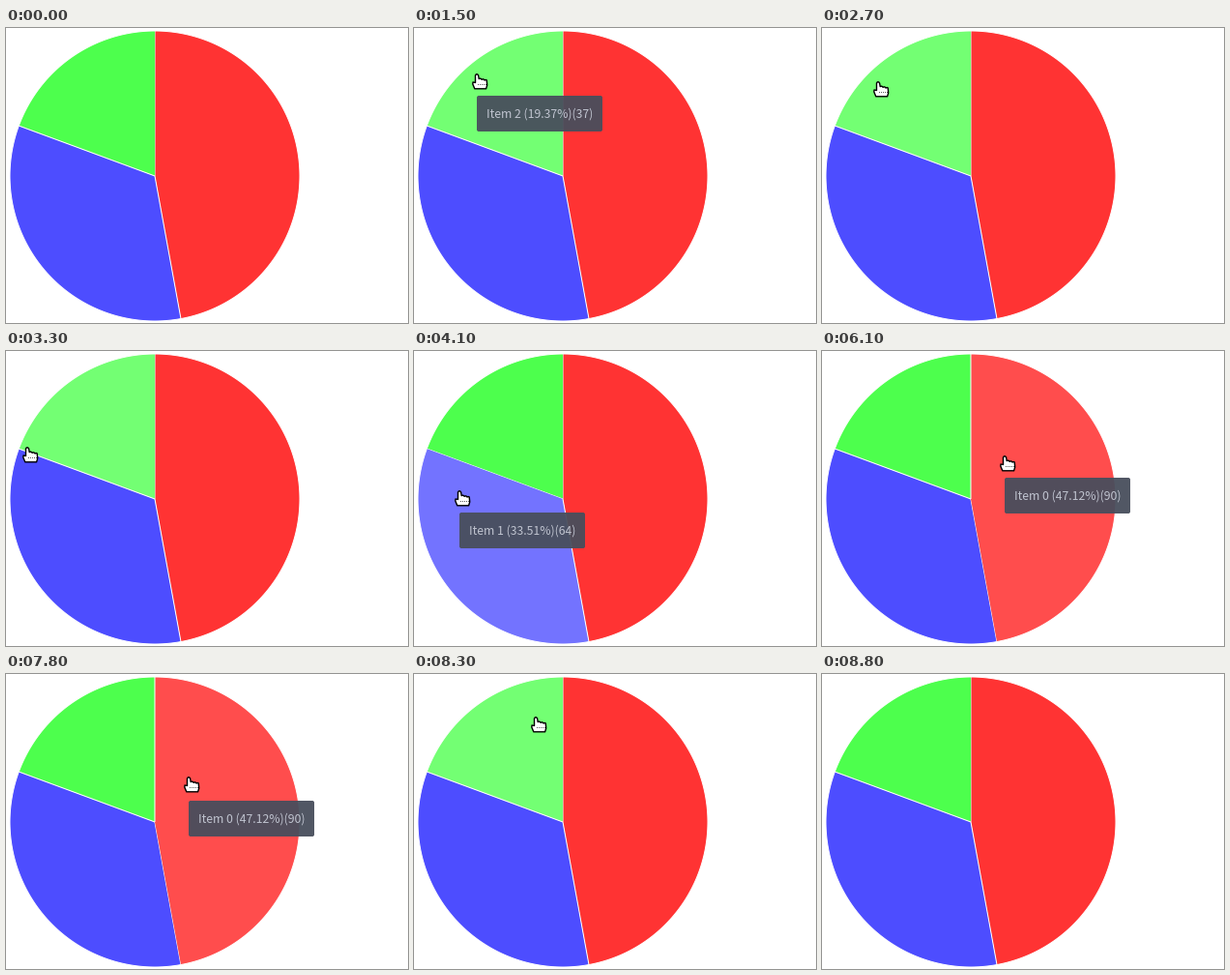
These frames come from a looping animation (416 px wide and 305 px high, 9.7 s). A matplotlib script:

```python
import numpy as np
import matplotlib.pyplot as plt
from matplotlib.animation import FuncAnimation
from matplotlib.colors import to_rgb
from matplotlib.patches import Polygon, FancyBboxPatch

W, H, DPI = 416, 305, 100
STEP, COUNT = 100, 97
PX = 72 / DPI
CX, CY, R = 154, 153, 150

VALUES = [90, 64, 37]
BASE = [to_rgb(c) for c in ("#ff3333", "#4d4dff", "#4dff4d")]
LIT = [tuple(min(1, 1.5 * v) for v in c) for c in BASE]
BOUNDS = np.concatenate([[0], np.cumsum(VALUES)]) / sum(VALUES)

# pointer moves: first frame, last frame, bend, end point
ENTRY = (46, -4)
MOVES = [
    (4, 10, (60, 30), (65, 47)),
    (25, 33, (42, 72), (22, 99)),
    (33, 36, (44, 139), (47, 144)),
    (49, 56, (129, 114), (189, 108)),
    (77, 87, (189, 71), (40, -5)),
]
TIP_DELAY, TIP_LINGER, TIP_DROP = 5, 2, 23

# outlines relative to the pointer tip
KNUCKLES = [(2.2 + 2.9 * i + dx, 5.6 + 0.7 * i - dy)
            for i in range(3) for dx, dy in ((0, 0), (1.2, 0.5), (2.2, 0.1))]
HAND = np.array([(-1.5, 2), (-0.6, 0.8), (0.6, 0.8), (1.6, 2)] + KNUCKLES + [
    (10.7, 12), (9.6, 15.8), (-2.2, 15.8), (-4.2, 11), (-4, 9), (-1.5, 9.5)])
ARROW = np.array([(0.8, 0.8), (0.8, 15.5), (4.2, 12.4), (6.6, 18.2),
                  (9.2, 17.1), (6.8, 11.5), (12, 11.5)])

fig = plt.figure(figsize=(W / DPI, H / DPI), dpi=DPI, facecolor="white")
ax = fig.add_axes([0, 0, 1, 1])
ax.set_xlim(0, W)
ax.set_ylim(H, 0)
ax.axis("off")


def sector(a, b):
    t = 2 * np.pi * np.linspace(a, b, 160)
    rim = np.column_stack([CX + R * np.sin(t), CY - R * np.cos(t)])
    return np.vstack([[CX, CY], rim])


def shape(points, fill, line, width, z, closed=True):
    patch = Polygon(points, closed=closed, fc=fill, ec=line, lw=width * PX,
                    joinstyle="round", capstyle="butt", zorder=z, snap=False)
    return ax.add_patch(patch)


def pointer(frame):
    pos = np.array(ENTRY, float)
    for first, last, bend, end in MOVES:
        u = np.clip((frame - first) / (last - first), 0, 1)
        s = u * u * (3 - 2 * u)
        pos = ((1 - s) ** 2 * pos + 2 * s * (1 - s) * np.array(bend)
               + s * s * np.array(end))
        if u < 1:
            break
    return np.round(pos)


def slice_at(x, y):
    dx, dy = x - CX, CY - y
    if np.hypot(dx, dy) > R:
        return None
    turn = np.arctan2(dx, dy) / (2 * np.pi) % 1
    return int(np.searchsorted(BOUNDS, turn, side="right")) - 1


def tip_spot(frame):
    """Where the pointer rests, if it has rested long enough."""
    for (_, stop, _, spot), (leave, *_) in zip(MOVES, MOVES[1:]):
        if stop + TIP_DELAY <= frame < leave + TIP_LINGER:
            return spot
    return None


# open outlines: the closing edge of a sector carries no line
slices = [shape(sector(a, b), c, "white", 1, 1 + i, closed=False)
          for i, (a, b, c) in enumerate(zip(BOUNDS, BOUNDS[1:], BASE))]

box = ax.add_patch(FancyBboxPatch(
    (0, 0), 130, 37, boxstyle="round,pad=0,rounding_size=2",
    fc="#484e5c", ec="none", alpha=0.95, zorder=10))
label = ax.text(0, 0, "", family="Noto Sans CJK JP", size=12.2 * PX,
                color="#bfc3cf", ha="left", va="baseline", zorder=11)

cursor = shape(HAND, "white", "black", 1.4, 20)
folds, = ax.plot([], [], ls="none", marker="s", ms=0.9 * PX, mew=0,
                 color="#555555", zorder=21)


def draw(frame):
    shown = MOVES[0][0] <= frame <= MOVES[-1][1]
    x, y = pointer(frame)
    hot = slice_at(x, y) if shown else None

    for i, part in enumerate(slices):
        part.set_facecolor(LIT[i] if i == hot else BASE[i])
        part.set_zorder(5 if i == hot else 1 + i)

    cursor.set_visible(shown)
    cursor.set_xy((ARROW if hot is None else HAND) + (x, y))
    folds.set_visible(hot is not None)
    folds.set_data(x + 0.5 + 2 * np.arange(5), np.full(5, y + 10.5))

    spot = tip_spot(frame)
    box.set_visible(spot is not None)
    label.set_visible(spot is not None)
    if spot:
        left, top = spot[0], spot[1] + TIP_DROP
        item = slice_at(*spot)
        share = 100 * VALUES[item] / sum(VALUES)
        box.set_x(left)
        box.set_y(top)
        label.set_text(f"Item {item} ({share:.2f}%)({VALUES[item]})")
        label.set_position((left + 10, top + 23))
    return [*slices, box, label, cursor, folds]


anim = FuncAnimation(fig, draw, frames=COUNT, interval=STEP,
                     repeat=True, repeat_delay=0, blit=False)
plt.show()
```
